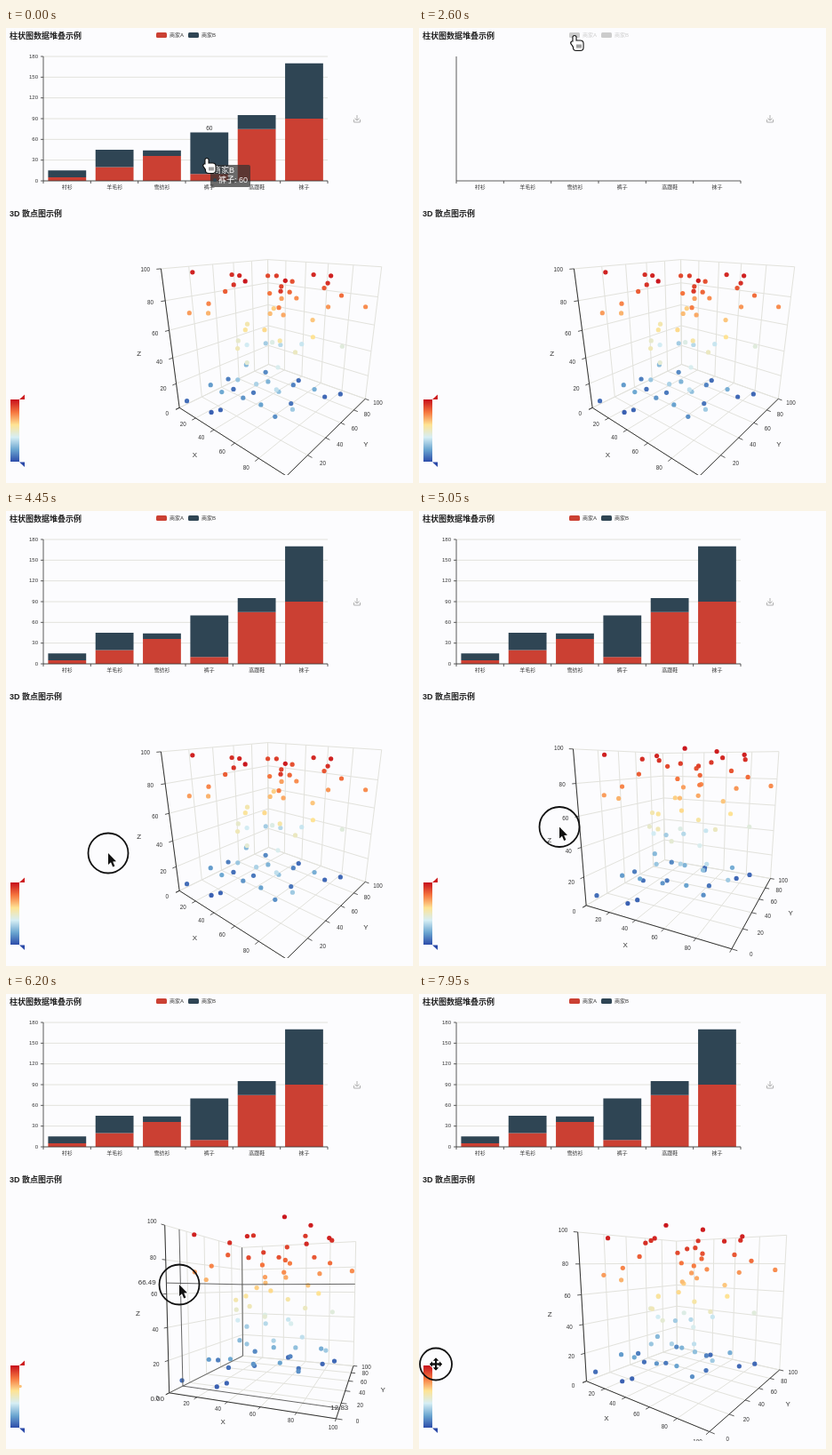
These frames come from a looping animation (458x512 px, 8000 ms). An HTML page with a canvas:

```html
<!DOCTYPE html>
<html lang="zh">
<head>
<meta charset="utf-8">
<style>
html, body { margin: 0; width: 100%; height: 100%; overflow: hidden; background: #fcfcfe; }
canvas { display: block; width: 458px; height: 512px; }
</style>
</head>
<body>
<canvas id="stage"></canvas>
<script>
const W = 458, H = 512, LOOP = 8000;
const FONT = '"Liberation Sans", "Noto Sans CJK SC", "Noto Sans CJK", sans-serif';
const INK = '#333', GRID = '#e2e2dc', RED = '#cb4033', NAVY = '#2f4554';
const canvas = document.getElementById('stage');
const ctx = canvas.getContext('2d');
const ratio = window.devicePixelRatio || 1;
canvas.width = W * ratio;
canvas.height = H * ratio;

const clamp = p => Math.min(1, Math.max(0, p));
const ease = p => p * p * (3 - 2 * p);
const mix = (a, b, p) => a + (b - a) * p;
const within = (t, a, b) => t >= a && t < b;

// Stops are [arrival, ...values]; each is held, then left for the last 65% of the gap.
function travel(stops, t) {
  const i = stops.findIndex(s => s[0] > t);
  if (i < 0) return stops[stops.length - 1].slice(1);
  if (i === 0) return stops[0].slice(1);
  const [a, b] = [stops[i - 1], stops[i]];
  const p = ease(clamp(1 - (b[0] - t) / (b[0] - a[0]) / .65));
  return a.slice(1).map((v, k) => mix(v, b[k + 1], p));
}

function text(s, x, y, size, { align = 'center', color = INK, bold = false } = {}) {
  ctx.font = `${bold ? 'bold ' : ''}${size}px ${FONT}`;
  ctx.textAlign = align;
  ctx.textBaseline = 'middle';
  ctx.fillStyle = color;
  ctx.fillText(s, x, y);
}

function line(points, color, width = 1) {
  ctx.beginPath();
  points.forEach(p => ctx.lineTo(...p));
  ctx.strokeStyle = color;
  ctx.lineWidth = width;
  ctx.stroke();
}

function shape(points, fill, outline) {
  ctx.beginPath();
  points.forEach(p => ctx.lineTo(...p));
  ctx.closePath();
  ctx.lineJoin = 'round';
  ctx.lineWidth = 2;
  ctx.strokeStyle = outline;
  if (outline) ctx.stroke();
  ctx.fillStyle = fill;
  ctx.fill();
}

function box(x, y, w, h, r, fill) {
  ctx.beginPath();
  ctx.roundRect(x, y, w, h, r);
  ctx.fillStyle = fill;
  ctx.fill();
}

function dot(x, y, r, color) {
  ctx.beginPath();
  ctx.arc(x, y, r, 0, 7);
  ctx.fillStyle = color;
  ctx.fill();
}

const title = (s, y) => text(s, 4, y, 9, { align: 'left', bold: true, color: '#222' });

// ---- stacked bars ----
const goods = [
  ['衬衫', 5, 10], ['羊毛衫', 20, 25], ['雪纺衫', 36, 8],
  ['裤子', 10, 60], ['高跟鞋', 75, 20], ['袜子', 90, 80]
];
const LEFT = 42, RIGHT = 362, BASE = 172, TALL = 140, STEP = (RIGHT - LEFT) / 6;
const CLICK = { bOff: 1350, aOff: 2200, aOn: 2650, bOn: 3550 };

// Share of a series still shown between its two clicks.
const shown = (off, on, t) =>
  1 - ease(clamp((t - off) / 250)) + ease(clamp((t - on) / 250));

function legend(x, label, color, on) {
  box(x, 5, 12, 6, 1.5, on ? color : '#ccc');
  text(label, x + 15, 8.5, 6, { align: 'left', color: on ? INK : '#ccc' });
}

function bars(t) {
  const aOn = !within(t, CLICK.aOff, CLICK.aOn);
  const bOn = !within(t, CLICK.bOff, CLICK.bOn);
  const showA = shown(CLICK.aOff, CLICK.aOn, t);
  const showB = shown(CLICK.bOff, CLICK.bOn, t);
  const scale = TALL / mix(100, 180, showB);
  const labelled = within(t, 850, CLICK.bOff) || within(t, CLICK.bOn, 3850);

  title('柱状图数据堆叠示例', 9.5);
  legend(169, '商家A', RED, aOn);
  legend(205, '商家B', NAVY, bOn);

  if (aOn || bOn) {
    const [top, gap] = bOn ? [180, 30] : [100, 20];
    for (let v = 0; v <= top; v += gap) {
      const y = BASE - v / top * TALL;
      line([[LEFT, y], [RIGHT, y]], GRID);
      line([[LEFT - 3, y], [LEFT, y]], INK, .8);
      text(v, 36, y, 6, { align: 'right' });
    }
  }
  goods.forEach(([name, a, b], i) => {
    const x = LEFT + STEP * i + 5.4, w = 42.8, mid = x + w / 2;
    const highA = a * showA * scale, highB = b * showB * scale;
    const top = BASE - highA - highB;
    box(x, BASE - highA, w, highA, 0, RED);
    box(x, top, w, highB, 0, NAVY);
    if (labelled || (name === '裤子' && t < 500)) text(b, mid, top - 4.5, 6.5);
    text(name, mid, 179.3, 6);
  });
  line([[LEFT, 32], [LEFT, BASE], [RIGHT, BASE]], INK, .8);
  for (let x = LEFT; x <= RIGHT + 1; x += STEP) line([[x, BASE], [x, BASE + 3]], INK, .8);

  line([[391.5, 103], [391.5, 106], [398.5, 106], [398.5, 103]], '#b0b0b0');
  line([[395, 98], [395, 104]], '#b0b0b0');
  line([[392.5, 101.5], [395, 104], [397.5, 101.5]], '#b0b0b0');
}

// ---- 3D scatter ----
const CX = 302.5, CY = 352.5, FOCAL = 322, DIST = 200;

let seed = 29;
const random = () => (seed = seed * 16807 % 2147483647) / 2147483647;

// Outlying points, then an even spread that thickens at the bottom and top.
const marks = [
  [8, 17, 97], [73, 1, 99], [82, 20, 98], [89, 50, 94], [99, 83, 76],
  [92, 15, 30], [8, 2, 8], [29, 7, 5], [87, 83, 7], [15, 7, 73]
];
for (let i = 0; i < 62; i++) {
  const p = i / 61;
  marks.push([
    mix(10, 86, (i * .618 + .3) % 1),
    mix(12, 86, random()),
    mix(6, 97, (p + ease(p)) / 2)
  ]);
}

const ramp = ['2a49a8', '6aa5d0', 'd6eef4', 'fee394', 'f6773f', 'c8121c']
  .map(hex => [0, 2, 4].map(k => parseInt(hex.slice(k, k + 2), 16)));

function heat(v) {
  const s = clamp(v / 100) * (ramp.length - 1);
  const i = Math.min(ramp.length - 2, Math.floor(s));
  return `rgb(${ramp[i].map((c, k) => Math.round(mix(c, ramp[i + 1][k], s - i)))})`;
}

// Rows of [time, elevation, azimuth] in degrees.
const views = [[4350, 20, 40], [5500, -1.6, 2], [6130, 4, 20], [7000, 9, 36.5]];

function camera(t) {
  const [a, b] = travel(views, t).map(d => d * Math.PI / 180);
  const project = (X, Y, Z) => {
    const x = X - 50, y = Y - 50, h = Z - 50;
    const side = x * Math.cos(b) + y * Math.sin(b);
    const ahead = y * Math.cos(b) - x * Math.sin(b);
    const k = FOCAL / (DIST + ahead * Math.cos(a) - h * Math.sin(a));
    return [CX + side * k, CY - (h * Math.cos(a) + ahead * Math.sin(a)) * k];
  };
  return { project, floor: a < 0 ? 100 : 0 };
}

function crosshair(project, floor, [X, Y, Z]) {
  const path = (...pts) => line(pts.map(p => project(...p)), '#555', .9);
  path([X, 0, floor], [X, 100, floor], [X, 100, 100 - floor]);
  path([100, Y, floor], [0, Y, floor], [0, Y, 100 - floor]);
  path([0, 0, Z], [0, 100, Z], [100, 100, Z]);
  text(X.toFixed(2), ...project(X, -10, floor), 8);
  text(Y.toFixed(2), ...project(100, Y, floor), 8);
  text(Z.toFixed(2), ...project(0, -15, Z), 8);
  dot(16, 488 - Z * .7, 1.8, heat(Z));
}

function scatter(t) {
  const { project, floor } = camera(t);
  title('3D 散点图示例', 209.5);

  ctx.save();
  ctx.beginPath();
  ctx.rect(0, 202, W, 301);
  ctx.clip();
  const edge = (p, q, color = GRID, w = 1) => line([project(...p), project(...q)], color, w);
  for (let v = 0; v <= 100; v += 20) {
    edge([v, 0, floor], [v, 100, floor]);
    edge([0, v, floor], [100, v, floor]);
    edge([v, 100, 0], [v, 100, 100]);
    edge([0, 100, v], [100, 100, v]);
    edge([0, v, 0], [0, v, 100]);
    edge([0, 0, v], [0, 100, v]);
  }

  // Each axis: point at a value, shifted outward by a gap.
  const axes = {
    X: (v, gap) => [v, -gap, floor],
    Y: (v, gap) => [100 + gap, v, floor],
    Z: (v, gap) => [0, -gap, v]
  };
  for (const [name, at] of Object.entries(axes)) {
    edge(at(0, 0), at(100, 0), INK);
    for (let v = 0; v <= 100; v += 20) {
      edge(at(v, 0), at(v, 3), INK, .8);
      if (v || name !== 'X') text(v, ...project(...at(v, 10)), 6.3);
    }
    text(name, ...project(...at(50, 22)), 8);
  }

  marks.forEach(m => dot(...project(...m), 2.6, heat(m[2])));
  if (within(t, 5500, 5720)) crosshair(project, floor, [.63, 100, 91.25]);
  if (within(t, 6130, 6434)) crosshair(project, floor, [0, 12.83, 66.49]);
  ctx.restore();
}

function colorBar() {
  for (let y = 418; y < 488; y++) box(5, y, 10, 1, 0, heat((488 - y) / .7));
  shape([[15, 418], [21, 412.5], [21, 418]], heat(98));
  shape([[15, 488.5], [21, 488.5], [21, 494]], heat(0));
}

// ---- pointer ----
const route = [
  [0, 226, 147], [950, 209, 11], [2150, 175, 9], [3500, 209, 11], [4350, 115, 385],
  [5500, 237.5, 301], [6130, 195, 327], [7000, 150, 350], [7800, 19, 416.5]
];

function tooltip(x, y, alpha) {
  ctx.globalAlpha = alpha;
  box(x + 4, y + 7, 45, 25, 2, 'rgba(50,50,50,.72)');
  text('商家B', x + 7, y + 14, 9, { align: 'left', color: '#fff' });
  dot(x + 9, y + 24, 2, NAVY);
  text('裤子: 60', x + 13, y + 24.5, 9, { align: 'left', color: '#fff' });
  ctx.globalAlpha = 1;
}

function hand() {
  // Drawn twice: a dark silhouette, then the white inside.
  for (const [grow, fill] of [[1.1, '#111'], [0, '#fff']]) {
    const part = (x, y, w, h, r) =>
      box(x - grow, y - grow, w + 2 * grow, h + 2 * grow, r + grow, fill);
    part(-1.5, 0, 3, 12, 1.5);
    part(-1, 5.5, 10.5, 10.5, 3);
    ctx.save();
    ctx.rotate(-.65);
    part(-8, 3.5, 3, 8, 1.5);
    ctx.restore();
  }
  for (let x = 3; x < 8; x += 2) line([[x, 9.5], [x, 13.5]], '#111', .8);
}

function arrow() {
  shape([[0, 0], [0, 13], [3, 10.3], [5.2, 15.4], [7.4, 14.4], [5.2, 9.6], [9, 9.3]], '#111', '#fff');
}

function moveCross() {
  for (const outline of ['#fff', null]) {
    for (let i = 0; i < 4; i++) {
      shape([[-1, 0], [-1, -4], [-3, -4], [0, -7], [3, -4], [1, -4], [1, 0]], '#111', outline);
      ctx.rotate(Math.PI / 2);
    }
  }
}

function pointer(t) {
  const [x, y] = travel(route, t);
  tooltip(x, y, clamp((680 - t) / 200));
  ctx.save();
  ctx.translate(x, y);
  if (t >= 4050) {
    const pressed = ease(clamp((t - 7800) / 120));
    ctx.beginPath();
    ctx.arc(0, 0, mix(22.5, 18, pressed), 0, 7);
    ctx.strokeStyle = '#111';
    ctx.lineWidth = 1.8;
    ctx.stroke();
  }
  if (t >= 7700) moveCross();
  else if (t < 550 || within(t, 850, 3850)) hand();
  else arrow();
  ctx.restore();
}

function frame() {
  const t = performance.now() % LOOP;
  ctx.setTransform(ratio, 0, 0, ratio, 0, 0);
  box(0, 0, W, H, 0, '#fcfcfe');
  bars(t);
  colorBar();
  scatter(t);
  pointer(t);
  requestAnimationFrame(frame);
}
frame();
</script>
</body>
</html>
```
